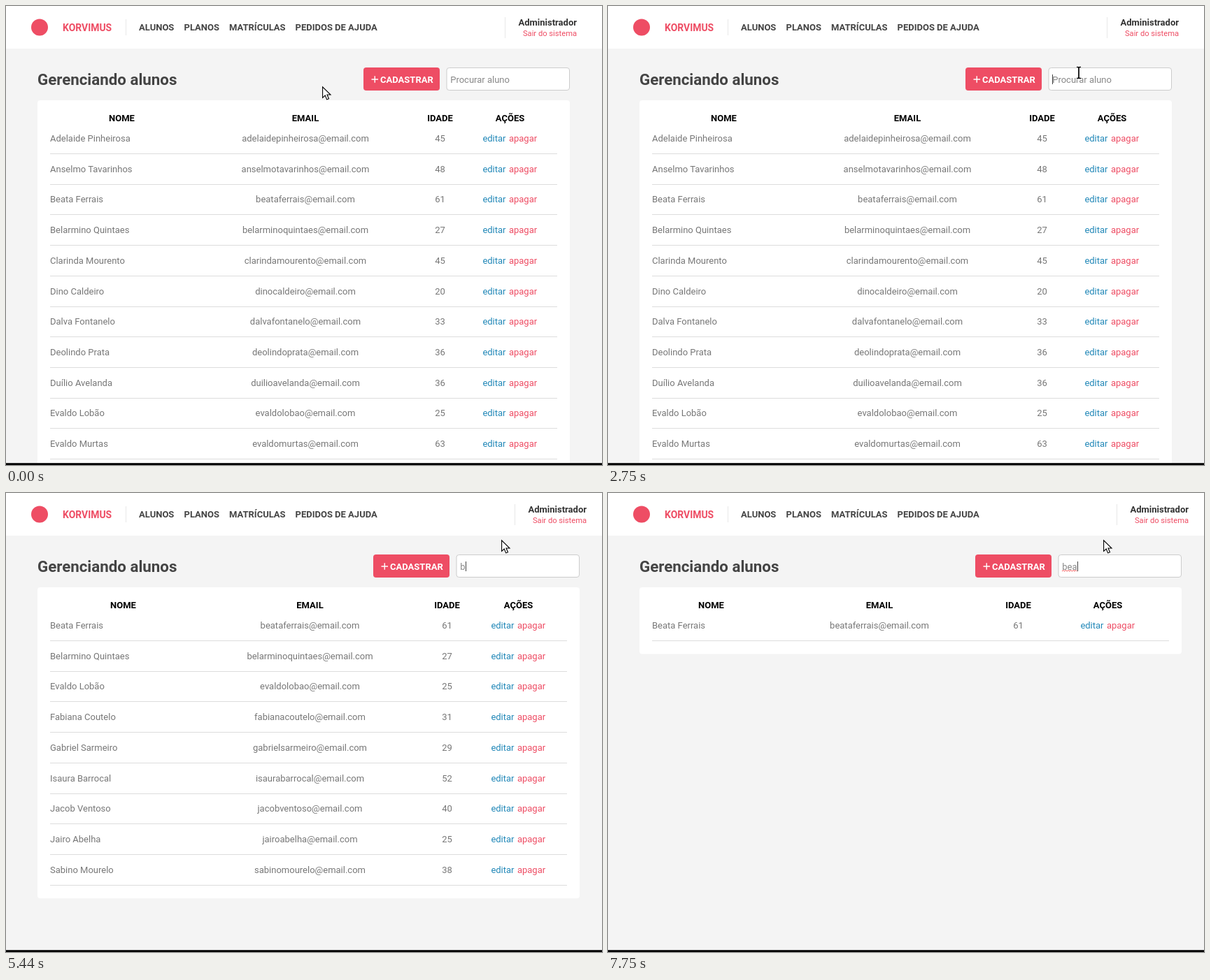
An HTML page that plays this animation: 852 px wide and 657 px high, repeating every 8 s.

```html
<!DOCTYPE html>
<html lang="pt">
<head>
<meta charset="utf-8">
<title>Gerenciando alunos</title>
<style>
  html, body { margin: 0; width: 100%; height: 100%; overflow: hidden; background: #f4f4f4; }
  svg { display: block; font: 13px Roboto, sans-serif; fill: #777; }
  .bold { font-weight: 700; }
  .head { font-weight: 700; fill: #000; }
  .nav { font-weight: 700; fill: #444; }
  .mid { text-anchor: middle; }
  .end { text-anchor: end; }
  .pink { fill: #ee4d64; }
  .blue { fill: #2288b8; }
  .rule { fill: #ddd; }
</style>
</head>
<body>
<svg width="852" height="657" viewBox="0 0 852 657">
  <rect width="852" height="657" fill="#f4f4f4"/>
  <rect width="852" height="61" fill="#fff"/>
  <circle class="pink" cx="48" cy="30.5" r="12"/>
  <text class="bold pink" x="81" y="35.5" font-size="13.95">KORVIMUS</text>
  <rect x="171" y="19" width="1" height="23" fill="#e8e8e8"/>
  <g class="nav">
    <text x="190" y="35">ALUNOS</text>
    <text x="254.5" y="35">PLANOS</text>
    <text x="319" y="35">MATRÍCULAS</text>
    <text x="413.5" y="35">PEDIDOS DE AJUDA</text>
  </g>
  <text class="nav" x="45" y="112.5" font-size="22.3">Gerenciando alunos</text>

  <g id="right">
    <rect x="713" y="16" width="1" height="30" fill="#e8e8e8"/>
    <text class="bold end" x="816" y="28" fill="#333">Administrador</text>
    <text class="pink end" x="816" y="43" font-size="11.16">Sair do sistema</text>
    <rect class="pink" x="511" y="88" width="109" height="33" rx="4"/>
    <path d="M522.5 105h9.5M527.25 100.2v9.6" stroke="#fff" stroke-width="1.4"/>
    <text class="bold" x="535" y="109.5" fill="#fff">CADASTRAR</text>
    <rect x="630" y="88.5" width="175.5" height="32" rx="3.5" fill="#fff" stroke="#ccc"/>
    <text id="query" x="635.2" y="109.5" fill="#888"></text>
    <path id="squiggle" fill="none" stroke="#f04040" stroke-width=".9"/>
    <rect id="caret" y="98" width="1" height="14" fill="#444"/>
  </g>

  <g id="list"></g>
  <rect y="655" width="852" height="2" fill="#000"/>
  <rect y="654" width="852" height="1" fill="#333"/>

  <path id="arrow" d="M.6.8V16.3L4.2 13 6.7 18.9 9.5 17.7 7 12H12Z" fill="#fff" stroke="#000" stroke-width="1.1"/>
  <g id="beam" fill="none">
    <path d="M-3-8h2L0-7 1-8H3M0-7V7M-3 8h2L0 7 1 8H3" stroke="#fff" stroke-width="3.4"/>
    <path d="M-3-8h2L0-7 1-8H3M0-7V7M-3 8h2L0 7 1 8H3" stroke="#000" stroke-width="1.7"/>
  </g>
</svg>
<script>
const $ = id => document.getElementById(id);
const LOOP = 8000, TICK = 62.5, ROW = 43.7;

const students = `Adelaide Pinheirosa,45
Anselmo Tavarinhos,48
Beata Ferrais,61
Belarmino Quintaes,27
Clarinda Mourento,45
Dino Caldeiro,20
Dalva Fontanelo,33
Deolindo Prata,36
Duílio Avelanda,36
Evaldo Lobão,25
Evaldo Murtas,63
Fabiana Coutelo,31
Gabriel Sarmeiro,29
Isaura Barrocal,52
Jacob Ventoso,40
Jairo Abelha,25
Sabino Mourelo,38`.split('\n').map(line => line.split(','));

// Column centres for each filter: name, email, age, actions
const columns = {
  '': [165.5, 428, 620.5, 720.5],
  b: [167.5, 434.5, 630.5, 732.5],
  be: [167.5, 434.5, 630.5, 732.5],
  bea: [147.5, 388, 586.5, 714.5]
};
const caretX = [635, 643, 649, 657];

// Pointer path: time, x, y
const path = [
  [937.5, 452, 115], [1062.5, 472, 118], [1187.5, 515, 126], [1312.5, 562, 131],
  [1437.5, 585, 130.5], [1500, 587, 129], [2375, 587, 129],
  [2437.5, 673, 107], [2562.5, 673, 107], [2625, 673, 111], [2750, 673, 95.5],
  [2812.5, 677, 86], [2937.5, 690, 80], [3250, 703, 77], [3437.5, 703, 77],
  [3500, 705, 74], [3812.5, 705, 74], [3875, 706, 72], [4062.5, 706, 72],
  [4125, 706, 71], [4375, 706, 71], [4437.5, 707, 68], [4625, 707, 68], [4687.5, 708, 67]
];
const caretOn = [[2630, 3190], [3750, 4250], [4810, 6310], [6630, 7190], [7750, LOOP]];

const plain = name => name.toLowerCase().normalize('NFD').replace(/[\u0300-\u036f ]/g, '');
const text = (x, y, cls, str) => `<text x="${x}" y="${y}" class="${cls}">${str}</text>`;
const show = (el, on) => el.setAttribute('visibility', on ? 'visible' : 'hidden');

function table(filter) {
  const rows = students.filter(([name]) => name.toLowerCase().includes(filter));
  const right = filter ? 820 : 806, cols = columns[filter];
  const height = 95.6 + ROW * (rows.length - 1);
  let out = `<rect x="45" y="135" width="${right - 45}" height="${height}" rx="4" fill="#fff"/>`;
  ['NOME', 'EMAIL', 'IDADE', 'AÇÕES'].forEach((h, i) => out += text(cols[i], 165, 'head mid', h));
  rows.forEach(([name, age], i) => {
    const y = 194 + ROW * i;
    out += text(63, y, '', name)
      + text(cols[1], y, 'mid', plain(name) + '@email.com')
      + text(cols[2], y, 'mid', age)
      + text(cols[3] - 6, y, 'blue end', 'editar')
      + text(cols[3] - 1.6, y, 'pink', 'apagar')
      + `<rect class="rule" x="63" y="${Math.round(211 + ROW * i)}" width="${right - 81}" height="1"/>`;
  });
  return out;
}

function pointer(t) {
  const i = path.findIndex(p => p[0] > t);
  if (i === 0) return path[0].slice(1);
  if (i < 0) return path[path.length - 1].slice(1);
  const [t0, x0, y0] = path[i - 1], [t1, x1, y1] = path[i];
  const k = (t - t0) / (t1 - t0);
  return [x0 + (x1 - x0) * k, y0 + (y1 - y0) * k];
}

let shown = null;
function draw() {
  const t = performance.now() % LOOP;
  const typed = 'bea'.slice(0, [5380, 5690, 6630].filter(s => t >= s).length);
  const filter = 'bea'.slice(0, [5440, 5750, 6630].filter(s => t >= s).length);
  if (filter !== shown) {
    $('list').innerHTML = table(filter);
    $('right').setAttribute('transform', `translate(${filter ? 14 : 0})`);
    shown = filter;
  }
  $('query').textContent = typed || 'Procurar aluno';
  $('caret').setAttribute('x', caretX[typed.length]);
  show($('caret'), caretOn.some(([a, b]) => t >= a && t < b));
  show($('squiggle'), t >= 7560);

  const tick = Math.floor((t + 3) / TICK) * TICK;
  const inField = tick >= 2437.5 && tick <= 2750;
  const move = `translate(${pointer(tick)})`;
  for (const id of ['arrow', 'beam']) {
    $(id).setAttribute('transform', move);
    show($(id), (id === 'beam') === inField);
  }
  requestAnimationFrame(draw);
}

$('squiggle').setAttribute('d', 'M635 112' + 'l1.8-1.5 1.8 1.5'.repeat(6));
draw();
</script>
</body>
</html>
```
